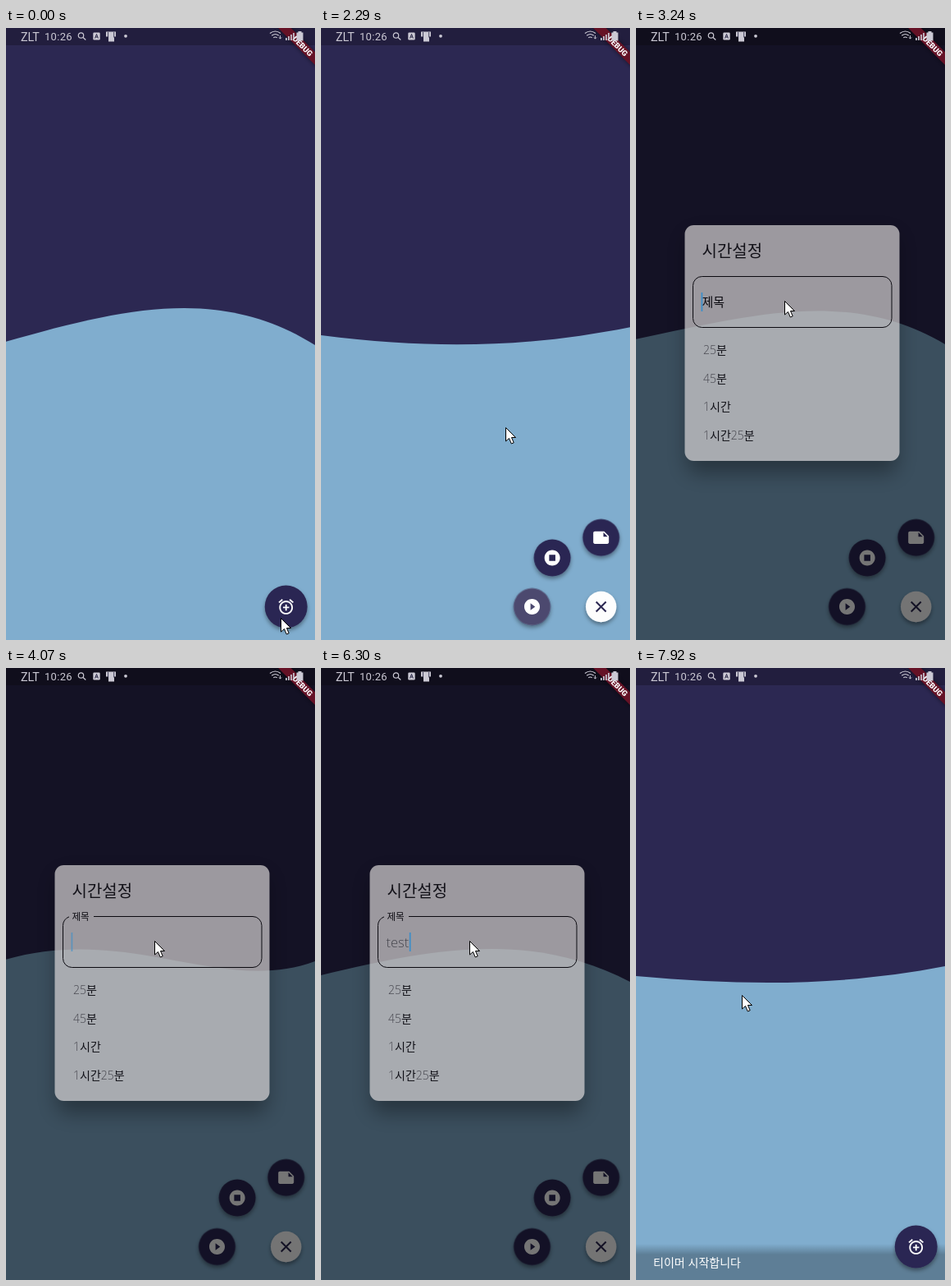
Write an HTML page that moves like this. It is 377 px wide and 745 px high and loops after 7990 ms.

```html
<!DOCTYPE html>
<html lang="ko">
<head>
<meta charset="utf-8">
<title>Timer</title>
<style>
html, body { margin: 0; width: 100%; height: 100%; overflow: hidden; background: #2c2852; }
svg { display: block; width: 100%; height: 100%; }
text { font-family: "Noto Sans CJK KR", "Noto Sans CJK", "Noto Sans", sans-serif; white-space: pre; }
.thin { font-family: "Open Sans", sans-serif; font-weight: 300; fill: #47474f; }
.status { fill: #cbc9d4; }
.status text { font-family: "Roboto", sans-serif; font-weight: 400; }
.ribbon text { font: 900 9.4px "Roboto", sans-serif; }
</style>
</head>
<body>
<svg viewBox="0 0 377 745" preserveAspectRatio="none">
  <defs>
    <filter id="lift" x="-40%" y="-40%" width="180%" height="190%">
      <feDropShadow dx="0" dy="3" stdDeviation="2.6" flood-color="#000" flood-opacity=".38"/>
    </filter>
    <filter id="blur" x="-30%" y="-30%" width="160%" height="160%"><feGaussianBlur stdDeviation="12"/></filter>
    <filter id="soft" x="-20%" y="-100%" width="140%" height="300%"><feGaussianBlur stdDeviation="2.5"/></filter>
    <mask id="outside">
      <rect width="377" height="745" fill="#fff"/>
      <rect x="59.5" y="240" width="262" height="287" rx="11" fill="#000"/>
    </mask>
    <linearGradient id="edge" x2="0" y2="1">
      <stop offset="0" stop-opacity="0"/><stop offset="1" stop-opacity=".27"/>
    </linearGradient>
  </defs>

  <rect width="377" height="745" fill="#2c2852"/>
  <path id="wave" fill="#80adce"/>
  <rect width="377" height="21" fill="#000" opacity=".24"/>

  <g id="snack">
    <rect y="701" width="377" height="13" fill="url(#edge)"/>
    <rect y="714" width="377" height="60" opacity=".27"/>
    <text x="21" y="729" font-size="14" fill="#fff">티이머 시작합니다</text>
  </g>

  <g id="close" transform="translate(341.7 704.5)">
    <circle id="closeFace" r="18.7" filter="url(#lift)"/>
    <path d="M-6-6 6 6M6-6-6 6" stroke="#2c2852" stroke-width="2"/>
  </g>
  <g id="dial"></g>
  <g id="fab">
    <circle r="26" fill="#2c2852" filter="url(#lift)"/>
    <path transform="scale(.93) translate(-12 -12)" fill="#fff" d="M7.88 3.39L6.6 1.86 2 5.71l1.29 1.53 4.59-3.85zM22 5.72l-4.6-3.86-1.29 1.53 4.6 3.86L22 5.72zM12 4c-4.97 0-9 4.03-9 9s4.02 9 9 9c4.97 0 9-4.03 9-9s-4.03-9-9-9zm0 16c-3.87 0-7-3.13-7-7s3.13-7 7-7 7 3.13 7 7-3.13 7-7 7zm1-11h-2v3H8v2h3v3h2v-3h3v-2h-3V9z"/>
  </g>

  <rect id="barrier" width="377" height="745"/>
  <g id="dialog">
    <g mask="url(#outside)">
      <rect x="62" y="252" width="257" height="290" rx="14" opacity=".33" filter="url(#blur)"/>
    </g>
    <rect x="59.5" y="240" width="262" height="287" rx="11" fill="#d6d3d3" opacity=".7"/>
    <text x="80.5" y="278.5" font-size="20" fill="#131219">시간설정</text>
    <path id="border" fill="none" stroke="#0b0a10"/>
    <text id="label" x="80.5" fill="#0b0a10" font-weight="500">제목</text>
    <text id="typed" class="thin" x="79.5" y="340" font-size="16.5"></text>
    <rect id="caret" y="322" width="1.8" height="23" fill="#3d8fca"/>
    <g id="items" font-size="14" fill="#111118" font-weight="500"></g>
  </g>

  <g class="ribbon" transform="translate(384 0) rotate(45)">
    <rect x="-36.7" y="25.7" width="73.4" height="11" opacity=".5" filter="url(#soft)"/>
    <rect x="-36.7" y="25.7" width="73.4" height="11" fill="#651226"/>
    <text y="34.6" text-anchor="middle" fill="#fff">DEBUG</text>
  </g>
  <g class="status">
    <text x="18" y="15.5" font-size="14.3">ZLT</text>
    <text x="47" y="15" font-size="13" letter-spacing=".3">10:26</text>
    <g fill="none" stroke="#cbc9d4" stroke-width="1.2">
      <circle cx="91.5" cy="9" r="3.2"/><path d="M94 11.5 97.3 14.5"/>
      <path d="M322 6.5Q328.5 1.5 335 6.5M324.2 9.2Q328.5 5.8 332.8 9.2M326.3 11.8Q328.5 10.2 330.7 11.8"/>
      <path d="M334.5 9v4M332.9 11.4l1.6 1.8 1.6-1.8" stroke-width=".9"/>
      <path d="M342 15v-3M345 15v-5M348 15V8M351 15V6" stroke-width="1.7"/>
    </g>
    <rect x="106.3" y="5.5" width="8.4" height="9" rx="1.3"/>
    <path d="M108.6 12.5 110.5 7.5 112.4 12.5M109.3 11h2.4" fill="none" stroke="#22203f"/>
    <path d="M122 4.5h12v6h-2v6h-7v-6h-3z"/>
    <path d="M124.5 5v6.5M131.7 5v6.5" stroke="#22203f" stroke-width=".8"/>
    <circle cx="146" cy="9.8" r="1.9"/>
    <path d="M354.5 5.5h2v-1.5h4v1.5h2v10h-8z"/>
  </g>
  <path id="mouse" d="M.5.5V17L4.500 13.500 7.300 20 10.200 18.800 7.500 12.500H12.500z" fill="#fff" stroke="#000" stroke-linejoin="round"/>
</svg>

<script>
const LOOP = 7990;
const $ = id => document.getElementById(id);
const set = (el, attrs) => { for (const k in attrs) el.setAttribute(k, attrs[k]); };
const clamp = v => Math.min(1, Math.max(0, v));
const mix = (a, b, p) => a + (b - a) * p;
const ramp = (t, a, b) => clamp((t - a) / (b - a));

const ticks = [0];
for (const [a, b, n] of [
  [50, 800, 11], [850, 1590, 12], [1660, 1730, 2], [1910, 2670, 13], [2740, 3060, 5],
  [3240, 3680, 8], [3880, 4650, 11], [4720, 4970, 4], [5220, 5600, 7], [5850, 6300, 8],
  [6480, 7260, 13], [7340, 7550, 4], [7780, 7920, 3]
]) for (let i = 0; i < n; i++) ticks.push(a + (b - a) * i / (n - 1));
const snap = t => ticks.filter(k => k <= t + 0.01).pop();

// Piecewise linear lookup
function track(t, times, values) {
  let i = 0;
  while (i < times.length - 2 && t > times[i + 1]) i++;
  return mix(values[i], values[i + 1], ramp(t, times[i], times[i + 1]));
}

// cubic-bezier(.42, 0, .58, 1)
function ease(x) {
  let lo = 0, hi = 1;
  for (let i = 0; i < 20; i++) {
    const s = (lo + hi) / 2, r = 1 - s;
    if (1.26 * s * r * r + 1.74 * s * s * r + s * s * s < x) lo = s; else hi = s;
  }
  return lo * lo * (3 - 2 * lo);
}

// Each handle swings between two divisors of the height; phases in half swings.
const beats = [0, 1260, 2290, 3240, 4970, 6300, 7920];
const handles = [
  { low: 1.9, high: 2.1, phase: [.35, 1, 1.525, 2.4, 3.62, 4.475, 5.54] },
  { low: 1.8, high: 2.4, phase: [.6, 1.29, 1.725, 2.55, 3.73, 4.61, 5.695] },
  { low: 1.8, high: 2.4, phase: [1.18, 1.83, 2.32, 3.225, 4.4, 5.275, 6.33] },
  { low: 1.9, high: 2.1, phase: [.27, .78, 1.36, 2.29, 3.44, 4.345, 5.34] }
];
function wavePath(t) {
  const [a, b, c, d] = handles.map(h => {
    const q = track(t, beats, h.phase) % 2;
    return 745 / mix(h.low, h.high, ease(q > 1 ? 2 - q : q));
  });
  return `M0 ${a}C150.8 ${b} 263.9 ${c} 377 ${d}V745H0Z`;
}

const disc = 'M12 2C6.48 2 2 6.48 2 12s4.48 10 10 10 10-4.48 10-10S17.52 2 12 2z';
const buttons = [
  disc + 'm-2 14.5v-9l6 4.5-6 4.5z',
  disc + 'M8 8v8h8V8z',
  'M22 10l-6-6H4c-1.1 0-2 .9-2 2v12c0 1.1.9 2 2 2h16c1.1 0 2-.9 2-2v-8zm-7-4.5l5.5 5.5H15V5.5z'
];
$('dial').innerHTML = buttons.map(d => `<g><circle r="22.5" fill="#2c2852" filter="url(#lift)"/>
  <circle r="22.5" fill="#fff" opacity="0"/>
  <path d="${d}" fill="#fff" fill-rule="evenodd" transform="scale(.95) translate(-12 -12)"/></g>`).join('');
const dial = [...$('dial').children];

$('items').innerHTML = ['25분', '45분', '1시간', '1시간25분'].map((s, i) =>
  `<text x="82" y="${397 + i * 34.5}">${s.replace(/\d+/g, '<tspan class="thin">$&</tspan>')}</text>`).join('');

const moves = [0, 650, 1200, 1850, 2290, 2670, 6800, 7340];
const mouseX = [335, 335, 274, 274, 225, 181, 181, 129];
const mouseY = [718, 718, 698, 698, 486, 332, 332, 398];

function typedAt(t) {
  if (t < 4700) return '';
  if (t < 5300) return 'x';
  if (t < 5450) return '';
  return 'test'.slice(0, t < 5600 ? 1 : t < 5900 ? 2 : t < 6100 ? 3 : 4);
}

function drawDial(t) {
  const open = ease(ramp(t, 500, 800)) * (1 - ease(ramp(t, 7650, 7850)));
  dial.forEach((g, i) => {
    const turn = i * Math.PI / 4, r = 84.2 * open;
    const x = 341.7 - r * Math.cos(turn), y = 704.5 - r * Math.sin(turn);
    set(g, { transform: `translate(${x} ${y}) rotate(${(1 - open) * 90})`, opacity: open });
  });
  const press = ramp(t, 1730, 1950) * (1 - ramp(t, 2450, 2670));
  dial[0].children[1].setAttribute('opacity', .16 * press);
  const grey = Math.round(mix(240, 253, ramp(t, 1300, 2000)));
  set($('closeFace'), { fill: `rgb(${grey},${grey},${grey})` });
  set($('close'), { opacity: open > 0 ? 1 : 0 });
  set($('fab'), {
    transform: `translate(341.7 704.5) scale(${mix(1, .7, open)})`,
    opacity: 1 - clamp((open - .25) / .75)
  });
}

function drawDialog(t) {
  const shown = ramp(t, 2400, 2600) * (1 - ramp(t, 7690, 7890));
  set($('barrier'), { opacity: .54 * shown });
  set($('dialog'), { opacity: shown });
  const up = ease(ramp(t, 3300, 3500)), gap = 15 * up;
  set($('border'), {
    d: `M${92 + gap} 302.5H301a11 11 0 0 1 11 11V353.5a11 11 0 0 1-11 11H80.5a11 11 0 0 1-11-11V313.5
      a11 11 0 0 1 ${up > .5 ? '7.5-10.6' : '11-11H' + (92 - gap)}`
  });
  set($('label'), { y: mix(339, 306.5, up), 'font-size': mix(15, 11.5, up) });
  const text = typedAt(t);
  $('typed').textContent = text;
  set($('caret'), {
    x: text ? 80 + $('typed').getComputedTextLength() : 79.5,
    opacity: .5 + .5 * Math.cos((t - 3240) / 500 * Math.PI)
  });
}

function draw(t) {
  set($('wave'), { d: wavePath(t) });
  drawDial(t);
  drawDialog(t);
  const rise = ramp(t, 7700, 7900);
  set($('snack'), { opacity: rise, transform: `translate(0 ${44 * (1 - ease(rise))})` });
  set($('mouse'), { transform: `translate(${track(t, moves, mouseX)} ${track(t, moves, mouseY)})` });
}

const start = performance.now();
function tick() {
  draw(snap((performance.now() - start) % LOOP));
  requestAnimationFrame(tick);
}
tick();
</script>
</body>
</html>
```
